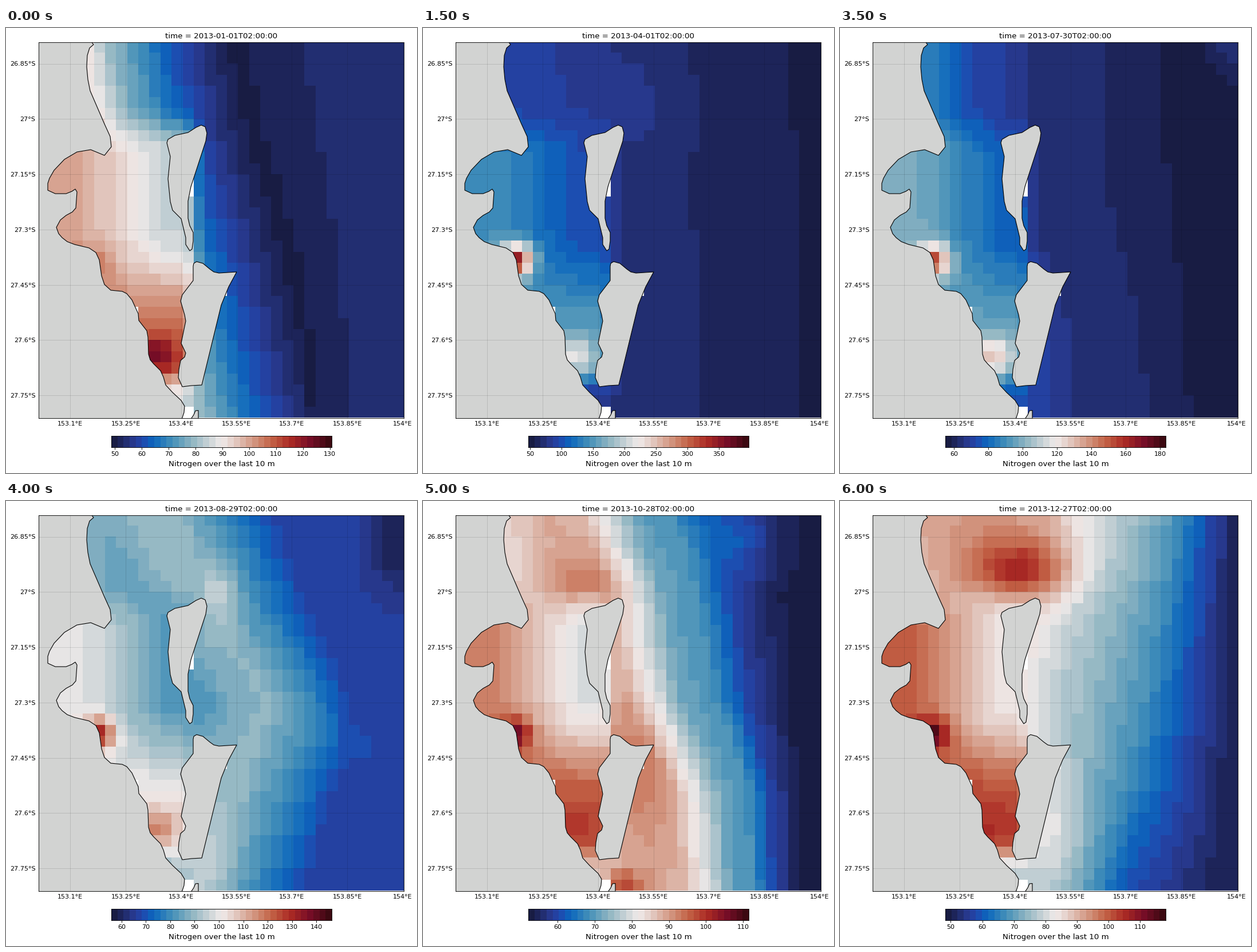
Write a matplotlib script that moves like this. It is 718 px wide and 779 px high and loops after 6500 ms.

```python
import numpy as np
import matplotlib.pyplot as plt
from matplotlib.animation import FuncAnimation
from matplotlib.colors import LinearSegmentedColormap
from matplotlib.patches import Polygon

W, H, DPI = 718, 779, 80
LEFT, TOP, RIGHT, BOTTOM = 57.0, 24.7, 695.2, 682.8
CELL, COLS, ROWS = 19.35, 33, 34
GRID_X, GRID_Y = 57.3, 24.5
LAND = "#d2d3d2"
FRAMES, STEP_DAYS = 13, 30
BANDS = 36

plt.rcParams.update({"font.family": "DejaVu Sans", "font.size": 10})

STOPS = [(0, "#181c43"), (0.045, "#212a66"), (0.09, "#283a90"), (0.13, "#2347ad"),
         (0.18, "#0b66bd"), (0.27, "#4590b9"), (0.36, "#8eb5c2"), (0.45, "#d0d6d9"),
         (0.5, "#f1eceb"), (0.55, "#e6d2cc"), (0.64, "#d59d89"), (0.73, "#c46548"),
         (0.82, "#ac2b24"), (0.91, "#780e28"), (1, "#3c0911")]
BALANCE = LinearSegmentedColormap.from_list("balance", STOPS, N=BANDS)

# Each month, in percent of its colour range:
#   shelf   (column, level) points of the profile from the coast out to sea
#   lean    shift of that profile in columns, evenly spaced from north to south
#   bay     levels at the west, east and south of the enclosed water
#   rivers  strength of the plumes at the two river mouths
#   eddies  (column, row, width, height, strength) of soft blobs
JAN = dict(
    limits=(48.7, 130.7), bay=(63, 44, 71), rivers=(8, 22),
    shelf=[(4, 50), (6, 37), (11, 17), (14, 8), (17, 1), (22, 2.5), (24, 5)],
    lean=(0, 1.5, 4, 6, 8), eddies=[])
APR = dict(
    limits=(47.3, 397.3), bay=(27, 13, 29), rivers=(63, 20),
    shelf=[(5, 12), (10, 9), (14, 6), (21, 4), (23, 2.5), (29, 2), (32, 0)],
    lean=(0, 0.5, 1, 1, 1), eddies=[(15, 5, 3, 3, 3)])
MAY = dict(
    limits=(46.2, 202.6), bay=(36, 27, 37), rivers=(52, 26),
    shelf=[(5, 28), (9, 20), (13, 16), (18, 14), (22, 8), (24, 3.5), (30, 0)],
    lean=(0.5, -1, 0.5, 4, 5), eddies=[])
JUL = dict(
    limits=(55, 183.3), bay=(35, 17, 31), rivers=(50, 26),
    shelf=[(5, 22), (8, 14), (14, 6.5), (20, 4.5), (23, 2.2), (30, 0.3), (32, 1)],
    lean=(0, 0, 1, 3.5, 4.5), eddies=[(32, 0, 1.5, 1.5, 5)])
SEP = dict(
    limits=(56.65, 109.3), bay=(64, 41, 71), rivers=(28, 8),
    shelf=[(10, 44), (14, 64), (17, 67), (19, 57), (22, 42), (26, 20), (32, 24)],
    lean=(-5, -1.5, 3.5, 0.5, -2.5),
    eddies=[(16, 6.5, 1.2, 1.8, 18), (26, 20, 2.5, 2, 8),
            (15.5, 31, 2, 4, 8), (32, 1, 2, 4, -24)])
OCT = dict(
    limits=(52.1, 111.5), bay=(69, 47, 76), rivers=(26, 5),
    shelf=[(8, 55), (12, 62), (15, 60), (18, 42), (20, 31), (23, 27), (26, 11), (30, 0)],
    lean=(-4, -1.3, 0, 4, 5),
    eddies=[(12, 6, 3, 2, 9), (25, 1, 3, 3, 10), (16, 22, 3, 5, 8), (14.5, 33, 1.2, 1, 20)])
DEC = dict(
    limits=(48.3, 118.1), bay=(74, 50, 78), rivers=(27, 4),
    shelf=[(10, 58), (13, 50), (16, 42), (20, 35), (24, 27), (27, 17), (32, 2)],
    lean=(5, 2, 0, -2, -5),
    eddies=[(13, 4.5, 3.5, 2, 24), (9, 0, 5, 3, 6), (16, 29, 2, 5, 11)])

KEYS = [(0, JAN), (3, APR), (5, MAY), (7, JUL), (9, SEP), (10, OCT), (12, DEC)]

MAINLAND = [
    (149, 20), (149, 24), (153, 29), (146, 35), (142, 48), (141, 68), (143, 90),
    (147, 110), (172, 168), (182, 190), (184, 208), (172, 223), (148, 213),
    (124, 217), (102, 230), (84, 249), (76, 263), (73, 272), (73, 284),
    (86, 290), (105, 290), (115, 286), (121, 282), (124, 287), (122, 315),
    (116, 322), (105, 328), (95, 336), (88, 349), (92, 360), (98, 367),
    (107, 374), (120, 379), (145, 385), (157, 393), (163, 406), (167, 434),
    (172, 449), (183, 459), (203, 461), (211, 465), (220, 476), (231, 500),
    (232, 512), (246, 530), (248, 541), (249, 571), (252, 581), (258, 588),
    (270, 600), (275, 611), (279, 625), (291, 638), (306, 652), (312, 662),
    (311, 673), (307, 685), (40, 700), (40, 10)]

NORTH_ISLAND = [
    (341, 170), (348, 173), (351, 184), (349, 198), (323, 278), (318, 303),
    (318, 333), (321, 346), (327, 358), (327, 373), (325, 387), (321, 390),
    (314, 379), (314, 367), (306, 334), (291, 319), (287, 304), (283, 264),
    (287, 225), (281, 201), (283, 195), (295, 188), (318, 183), (332, 174)]

SOUTH_ISLAND = [
    (333, 409), (344, 412), (356, 422), (363, 427), (372, 429), (403, 427),
    (389, 453), (376, 485), (342, 625), (324, 626), (308, 628), (301, 612),
    (302, 598), (305, 582), (312, 576), (314, 569), (306, 552), (309, 537),
    (314, 513), (312, 502), (305, 478), (308, 467), (327, 442), (327, 417),
    (328, 412)]

ISLET = [(324, 683), (328, 677), (331, 670), (336, 669.5), (336, 690), (324, 690)]

NO_DATA = [(12, 13), (13, 13), (33, 13), (22, 16), (24, 8)]

row, col = np.mgrid[:ROWS, :COLS].astype(float)


def ramp(value, start, end):
    t = np.clip((value - start) / (end - start), 0, 1)
    return t * t * (3 - 2 * t)


def blob(x, y, wide, high, strength):
    return strength * np.exp(-((col - x) / wide) ** 2 / 2 - ((row - y) / high) ** 2 / 2)


def field(month):
    # The lean fades out towards the eastern edge.
    shift = np.interp(row, np.linspace(0, ROWS - 1, 5), month["lean"])
    across = col - shift * np.clip((COLS - col) / 10, 0, 1)
    levels = np.interp(across, *zip(*month["shelf"]))
    for eddy in month["eddies"]:
        levels = levels + blob(*eddy)

    west, east, south = month["bay"]
    bay = np.interp(col, (3, 11), (west, east))
    bay += (south - bay) * ramp(row, 16, 26)
    inside = ramp(row, 5, 10) * ramp(col, 14.5, 12.5) * ramp(row, 32, 28.5)
    levels = levels + (bay - levels) * inside

    river, creek = month["rivers"]
    return levels + blob(5, 19.3, 1, 1, river) + blob(10.2, 27.9, 1.4, 1.2, creek)


STATES = [(frame, field(month), np.array(month["limits"])) for frame, month in KEYS]


def state(frame):
    """Field and colour limits, linear between the key months."""
    for (a, *start), (b, *end) in zip(STATES, STATES[1:]):
        if frame <= b:
            t = (frame - a) / (b - a)
            return [p + (q - p) * t for p, q in zip(start, end)]


def place(left, top, right, bottom):
    return fig.add_axes([left / W, 1 - bottom / H, (right - left) / W, (bottom - top) / H])


def degrees(value, side):
    return f"{value:.2f}".rstrip("0").rstrip(".") + "°" + side


fig = plt.figure(figsize=(W / DPI, H / DPI), dpi=DPI, facecolor="white")

ax = place(LEFT, TOP, RIGHT, BOTTOM)
extent = (GRID_X, GRID_X + COLS * CELL, GRID_Y + ROWS * CELL, GRID_Y)
sea = ax.imshow(np.zeros((ROWS, COLS)), cmap=BALANCE, vmin=0, vmax=1,
                extent=extent, interpolation="nearest", aspect="auto")
for shape in (MAINLAND, NORTH_ISLAND, SOUTH_ISLAND, ISLET):
    ax.add_patch(Polygon(shape, facecolor=LAND, edgecolor="black", lw=1))
ax.set_xlim(LEFT, RIGHT)
ax.set_ylim(BOTTOM, TOP)
ticks = np.arange(7)
ax.set_xticks(112.3 + 96.75 * ticks, [degrees(153.1 + 0.15 * i, "E") for i in ticks])
ax.set_yticks(62.5 + 96.75 * ticks, [degrees(26.85 + 0.15 * i, "S") for i in ticks])
ax.tick_params(length=0, pad=5)
ax.set_axisbelow(False)
ax.grid(color="black", alpha=0.13, lw=0.8)
title = ax.set_title("", fontsize=12)

bar = place(184, 714.3, 569, 733.7)
bar.imshow(np.linspace(0, 1, BANDS)[None], cmap=BALANCE, extent=(0, 1, 0, 1),
           transform=bar.transAxes, interpolation="nearest", aspect="auto")
bar.set_yticks([])
bar.set_xlabel("Nitrogen over the last 10 m", fontsize=12, labelpad=4.8)


def draw(frame):
    levels, (low, high) = state(frame)
    shades = np.round(np.clip(levels / 100, 0, 1) * (BANDS - 1)) / (BANDS - 1)
    shades[tuple(zip(*NO_DATA))] = np.nan
    sea.set_data(shades)
    day = np.datetime64("2013-01-01") + STEP_DAYS * frame
    title.set_text(f"time = {day}T02:00:00")
    span = high - low
    step = 10 if span < 100 else 20 if span < 200 else 50
    bar.set_xticks(np.arange(np.ceil(low / step) * step, high, step))
    bar.set_xlim(low, high)
    return sea, title


anim = FuncAnimation(fig, draw, frames=FRAMES, interval=500, repeat=True,
                     repeat_delay=0, blit=False)
plt.show()
```
